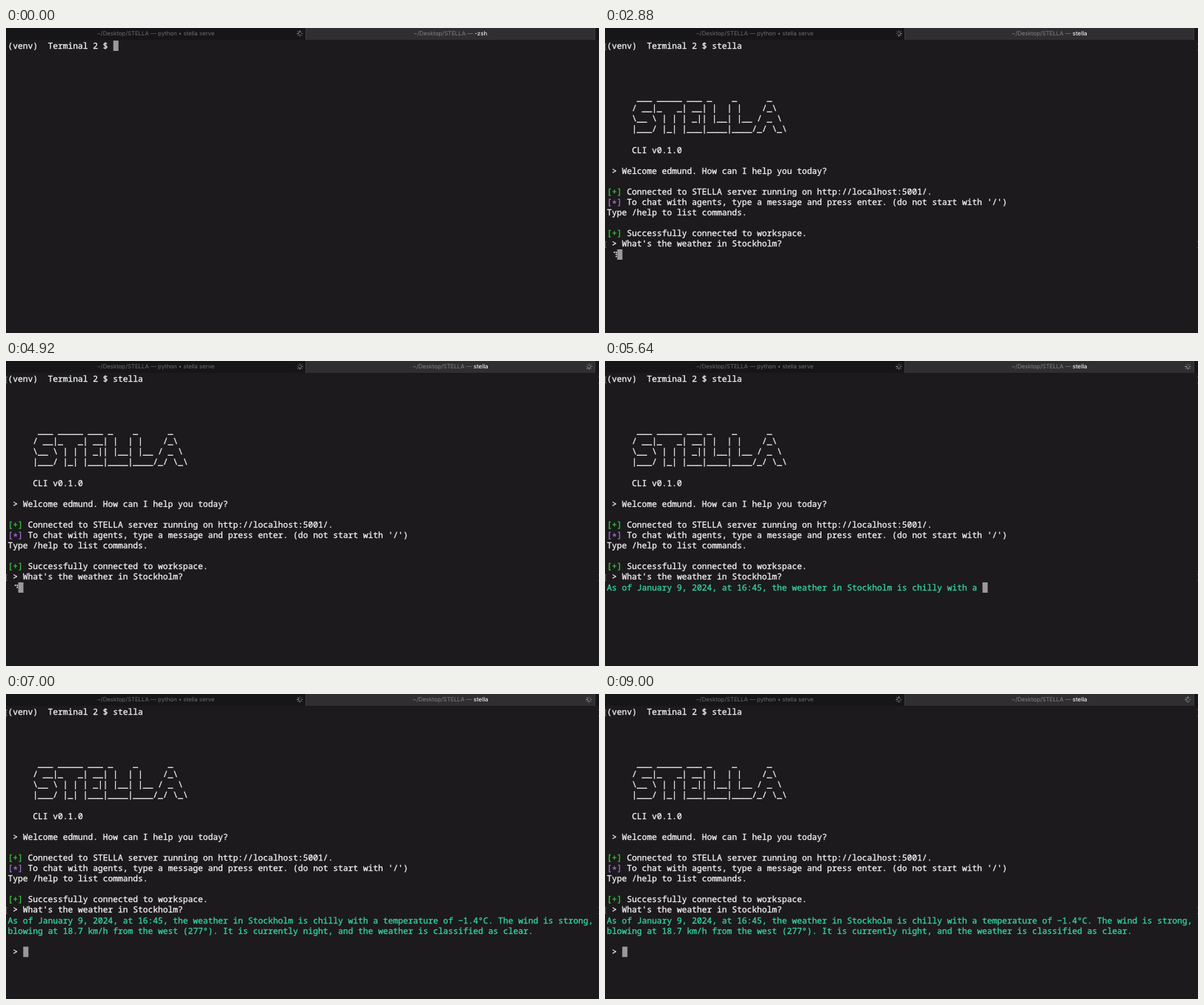
An HTML page for the animation above (9040 ms loop, 800 by 412 pixels).

```html
<!DOCTYPE html>
<html lang="en">
<head>
<meta charset="utf-8">
<title>Terminal session</title>
<style>
  html, body { margin: 0; width: 100%; height: 100%; overflow: hidden; background: #1c1a1c; }
  #stage { position: relative; width: 800px; height: 412px; overflow: hidden; background: #1c1a1c; }
  #stage * { position: absolute; }
  #stage b, #stage i { position: static; font-style: normal; font-weight: inherit; }

  .bar { left: 0; top: 0; width: 800px; height: 15.5px; background: #161517; }
  .tab {
    top: 0; height: 15.5px; box-sizing: border-box; text-align: center; white-space: pre;
    font: 7.8px/15px Inter, "Liberation Sans", sans-serif; color: #6e6c6e;
    text-rendering: geometricPrecision;
  }
  #left { left: 0; width: 404px; }
  #right { left: 404px; width: 391px; background: #302e30; border: solid #3d3b3d; border-width: 0 1px; color: #858385; }
  #right b { color: #f0eff0; font-weight: 500; }

  .spin { top: 2.5px; width: 9px; height: 9px; stroke: #c4c2c4; stroke-width: .9; stroke-linecap: round; }

  #screen {
    left: 2.5px; top: 16.5px; color: #f6f5f6; white-space: pre;
    font: 400 11.25px/14.1px "Noto Sans Mono", "DejaVu Sans Mono", monospace;
    -webkit-text-stroke: .3px;
    text-rendering: geometricPrecision; font-variant-ligatures: none;
  }
  .row { left: 0; margin-top: 1px; }
  .ok { color: #35c63f; }
  .tip { color: #9f6cd2; }
  #stage .star { position: relative; top: 2px; }
  #reply { color: #35d8a0; }
  #cursor { left: 0; top: 0; width: 7px; height: 14px; background: #9a989b; }
  #dots { left: 8.6px; width: 7px; height: 14px; fill: #f0eff0; }
  .mark { width: 2px; height: 9px; box-sizing: border-box; border: 1px solid #5e5c5e; }
  .open { left: 0; border-right: 0; }
  .close { left: 798.5px; border-left: 0; }
</style>
</head>
<body>
<div id="stage">
  <div class="bar"></div>
  <div class="tab" id="left">~/Desktop/STELLA — python • stella serve</div>
  <div class="tab" id="right">~/Desktop/STELLA — <b id="task"></b></div>
  <div id="screen"></div>
</div>
<script>
const LOOP = 9040, CELL = 6.75, LINE = 14.1, TOP = 16.5;
const AT = {
  type: 120, run: 520, banner: 680, connect: 760, ready: 860,
  ask: 1215, send: 2796, busy: 3100, reply: 5250, done: 6400
};
const COMMAND = "stella";
const QUESTION = "What's the weather in Stockholm?";
const REPLY = "As of January 9, 2024, at 16:45, the weather in Stockholm is chilly with a temperature of −1.4°C. The wind is strong,\n" +
  "blowing at 18.7 km/h from the west (277°). It is currently night, and the weather is classified as clear.";

const art = String.raw`
      ___ _____ ___ _    _      _
     / __|_   _| __| |  | |    /_\
     \__ \ | | | _|| |__| |__ / _ \
     |___/ |_| |___|____|____/_/ \_\ `.slice(1);
const plus = "<i class='ok'>[+]</i> ";

const stage = document.getElementById("stage");
const screen = document.getElementById("screen");
const task = document.getElementById("task");
const timed = [];

function add(parent, html, start = 0) {
  parent.insertAdjacentHTML("beforeend", html);
  const el = parent.lastElementChild;
  timed.push({ el, start });
  return el;
}

const row = (n, html, start, id = "") =>
  add(screen, `<div class="row" id="${id}" style="top:${n * LINE}px">${html}</div>`, start);

const line0 = row(0, "", 0);
row(5, art, AT.banner);
row(10, "     CLI v0.1.0", AT.banner);
row(12, " &gt; Welcome edmund. How can I help you today?", AT.banner);
row(14, plus + "Connected to STELLA server running on http://localhost:5001/.", AT.connect);
row(15, "<i class='tip'>[<i class='star'>*</i>]</i> To chat with agents, type a message and press enter. (do not start with '/')", AT.connect);
row(16, "Type /help to list commands.", AT.connect);
row(18, plus + "Successfully connected to workspace.", AT.ready);
const prompt = row(19, "", AT.ready);
const reply = row(20, "", AT.reply, "reply");
row(23, " &gt; ", AT.done);
const cursor = add(screen, "<div id='cursor'></div>");

// Brackets at both edges of a submitted line
for (const [n, start] of [[0, AT.run], [19, AT.send]])
  for (const side of ["open", "close"])
    add(stage, `<div class="mark ${side}" style="top:${TOP + n * LINE + 4}px"></div>`, start);

// Tab activity wheels
function wheel(cx, start) {
  let spokes = "";
  for (let i = 0; i < 8; i++)
    spokes += `<line y1="-1.9" y2="-3.8" opacity="${1 - i * 0.1}" transform="rotate(${-45 * i})"/>`;
  return add(stage, `<svg class="spin" style="left:${cx - 4.5}px" viewBox="-4.5 -4.5 9 9"><g>${spokes}</g></svg>`, start)
    .firstElementChild;
}
const wheels = [wheel(396.5, 0), wheel(786, AT.busy)];

// Braille spinner: each digit names a dot of the 2 x 3 cell
const BRAILLE = "124 145 1456 456 3456 356 236 1236 123 1234".split(" ");
const dots = add(screen, `<svg id="dots" style="top:${20 * LINE}px" viewBox="0 0 7 14">` +
  [1, 2, 3, 4, 5, 6].map(d =>
    `<circle cx="${d < 4 ? 1.6 : 4.2}" cy="${4 + (d - 1) % 3 * 2.8}" r=".95"/>`).join("") + "</svg>", AT.send);

const typed = (text, t, start, step) =>
  text.slice(0, Math.max(0, Math.floor((t - start) / step) + 1));

function streamed(t) {
  const n = Math.max(0, Math.floor((t - AT.reply) * 0.202));
  if (n >= REPLY.length) return REPLY;
  const part = REPLY.slice(0, n);
  return part.slice(0, Math.max(part.lastIndexOf(" "), part.lastIndexOf("\n")) + 1);
}

function cursorCell(t, command, question, answer) {
  if (t < AT.run) return [0, 21 + command.length];
  if (t < AT.banner) return [1, 0];
  if (t < AT.connect) return [14, 0];
  if (t < AT.ready) return [18, 0];
  if (t < AT.send) return [19, 3 + question.length];
  if (t < AT.reply) return [20, 2];
  if (t >= AT.done) return [23, 3];
  const lines = answer.split("\n");
  return [19 + lines.length, lines.at(-1).length];
}

function draw(t) {
  for (const { el, start } of timed) el.style.visibility = t >= start ? "visible" : "hidden";

  const command = typed(COMMAND, t, AT.type, 60);
  const question = typed(QUESTION, t, AT.ask, 47);
  const answer = streamed(t);
  line0.textContent = "(venv)  Terminal 2 $ " + command;
  prompt.textContent = " > " + question;
  reply.textContent = answer;
  task.textContent = t < AT.run ? "-zsh" : "stella";

  const [r, c] = cursorCell(t, command, question, answer);
  cursor.style.transform = `translate(${c * CELL}px, ${r * LINE}px)`;

  const turn = Math.floor(t / 80) % 8 * 45;
  for (const w of wheels) w.setAttribute("transform", `rotate(${turn})`);

  if (t >= AT.reply) dots.style.visibility = "hidden";
  const glyph = BRAILLE[Math.floor(Math.max(0, t - AT.send) / 41.5) % 10];
  [...dots.children].forEach((dot, i) => dot.setAttribute("opacity", glyph.includes(i + 1) ? 1 : 0));
}

const origin = performance.now();
function tick() {
  draw((performance.now() - origin) % LOOP);
  requestAnimationFrame(tick);
}
draw(0);
requestAnimationFrame(tick);
</script>
</body>
</html>
```
